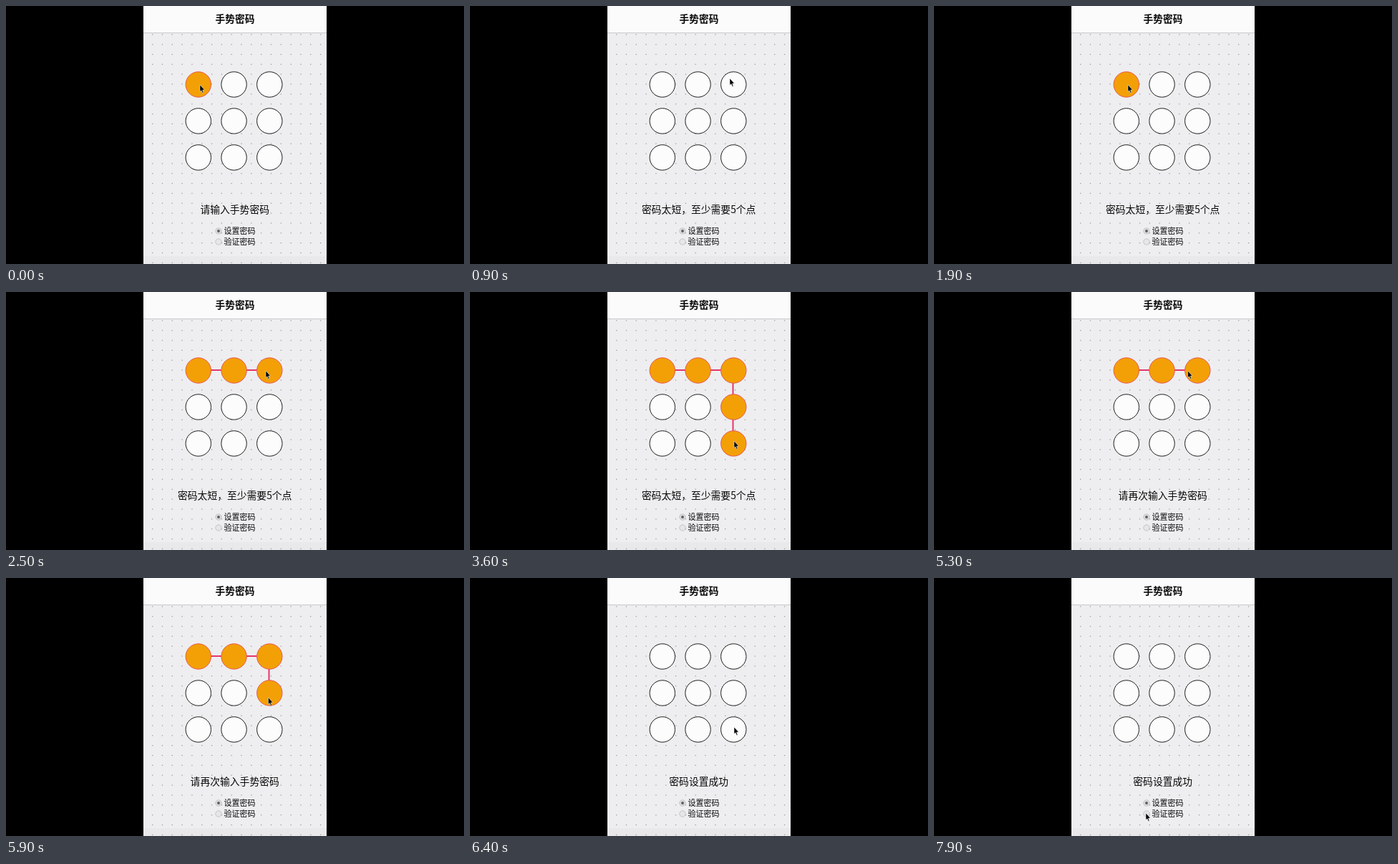
Write an HTML page with a canvas that moves like this. It is 640 px wide and 360 px high and loops after 8000 ms.

```html
<!DOCTYPE html>
<html lang="zh-CN">
<head>
<meta charset="utf-8">
<title>手势密码</title>
<style>
html, body { margin: 0; width: 100%; height: 100%; overflow: hidden; background: #000; }
canvas { display: block; width: 640px; height: 360px; }
</style>
</head>
<body>
<canvas id="stage" width="640" height="360"></canvas>
<script>
const ctx = document.getElementById('stage').getContext('2d');
const FONT = '"Noto Sans CJK SC", "Noto Sans CJK", sans-serif';
const LOOP = 8000, STEP = 100, RADIUS = 17.7;

const dots = Array.from({ length: 9 }, (_, i) => ({
  x: 268.8 + (i % 3) * 49.75,
  y: 109.5 + Math.floor(i / 3) * 50.95
}));

// Places the pointer visits
const home = { x: 271, y: 110 };
const corner = { x: 363, y: 110 };
const lift = { x: 363, y: 101 };
const low = { x: 369, y: 208 };
const below = { x: 300, y: 339 };
const radio = { x: 296, y: 328 };

const path = [
  [0, home], [900, lift], [1300, lift],
  [1900, home], [2500, corner], [3600, low], [4100, low],
  [4800, home], [5350, corner], [6300, low], [6700, low],
  [7300, below], [7400, below], [7900, radio]
];

// Each stroke changes the message when it is released
const strokes = [
  { start: 0, end: 900, reply: '密码太短，至少需要5个点' },
  { start: 1900, end: 3900, reply: '请再次输入手势密码' },
  { start: 4800, end: 6400, reply: '密码设置成功' }
];

function pointer(t) {
  const i = path.findIndex(([time]) => time > t);
  if (i < 0) return radio;
  const [t0, a] = path[i - 1], [t1, b] = path[i];
  const p = (t - t0) / (t1 - t0);
  return { x: a.x + (b.x - a.x) * p, y: a.y + (b.y - a.y) * p };
}

// Dots touched so far by the stroke in progress
function chosen(t) {
  const stroke = strokes.find(s => t >= s.start && t < s.end);
  const hit = [];
  if (!stroke) return hit;
  for (let s = stroke.start; s <= t; s += 20) {
    const p = pointer(s);
    const dot = dots.find(d => Math.hypot(d.x - p.x, d.y - p.y) < RADIUS);
    if (dot && !hit.includes(dot)) hit.push(dot);
  }
  return hit;
}

function message(t) {
  const done = strokes.filter(s => t >= s.end).pop();
  return done ? done.reply : '请输入手势密码';
}

function rect(x, y, w, h, color) {
  ctx.fillStyle = color;
  ctx.fillRect(x, y, w, h);
}

function circle(x, y, r, fill, stroke, width = 1) {
  ctx.beginPath();
  ctx.arc(x, y, r, 0, Math.PI * 2);
  ctx.fillStyle = fill;
  ctx.fill();
  if (!stroke) return;
  ctx.lineWidth = width;
  ctx.strokeStyle = stroke;
  ctx.stroke();
}

function text(str, x, y, size, align = 'center', weight = 500) {
  ctx.font = `${weight} ${size}px ${FONT}`;
  ctx.textAlign = align;
  ctx.fillStyle = '#080808';
  ctx.fillText(str, x, y);
}

function drawPage() {
  rect(0, 0, 640, 360, '#000');
  rect(192, 0, 256, 360, '#eeeef0');
  rect(192, 349, 256, 11, '#e9e9eb');
  for (let y = 39.2; y < 360; y += 13.85)
    for (let x = 204; x < 446; x += 13.82)
      rect(x, y, 1.3, 1.2, '#98989c');
  rect(192, 0, 256, 37, '#fbfbfb');
  rect(192, 37, 256, 1, '#c9c9cd');
  text('手势密码', 320, 23, 13.7, 'center', 700);
}

function drawLock(hit, tip) {
  if (hit.length) {
    ctx.beginPath();
    [...hit, tip].forEach(p => ctx.lineTo(p.x - 0.8, p.y - 0.5));
    ctx.lineWidth = 2;
    ctx.strokeStyle = '#e5346c';
    ctx.stroke();
  }
  for (const d of dots) {
    const on = hit.includes(d);
    circle(d.x, d.y, RADIUS, on ? '#f3a006' : '#fcfcfc', on ? '#e8584e' : '#1c1c1c');
  }
}

function drawRadio(y, label, on) {
  circle(297, y, 4.2, on ? '#dcdcde' : '#e6e6e8', '#bcbcbe', 0.8);
  if (on) circle(297, y, 1.9, '#5c5c5e');
  text(label, 304.5, y + 4.3, 11, 'left');
}

function drawPointer({ x, y }) {
  const shape = [[0, 0], [0, 9.5], [2, 7.8], [3.7, 11.5], [5, 11], [3.6, 7.2], [6.4, 7]];
  ctx.beginPath();
  shape.forEach(([dx, dy]) => ctx.lineTo(x + dx, y + dy));
  ctx.closePath();
  ctx.lineJoin = 'round';
  ctx.fillStyle = '#000';
  ctx.fill();
  ctx.lineWidth = 0.7;
  ctx.strokeStyle = 'rgba(255, 255, 255, 0.7)';
  ctx.stroke();
}

function frame() {
  const t = Math.floor(performance.now() % LOOP / STEP) * STEP;
  const tip = pointer(t);
  drawPage();
  drawLock(chosen(t), tip);
  text(message(t), 319.7, 288.5, 13.8);
  drawRadio(314, '设置密码', true);
  drawRadio(329, '验证密码', false);
  drawPointer(tip);
  requestAnimationFrame(frame);
}

frame();
</script>
</body>
</html>
```
